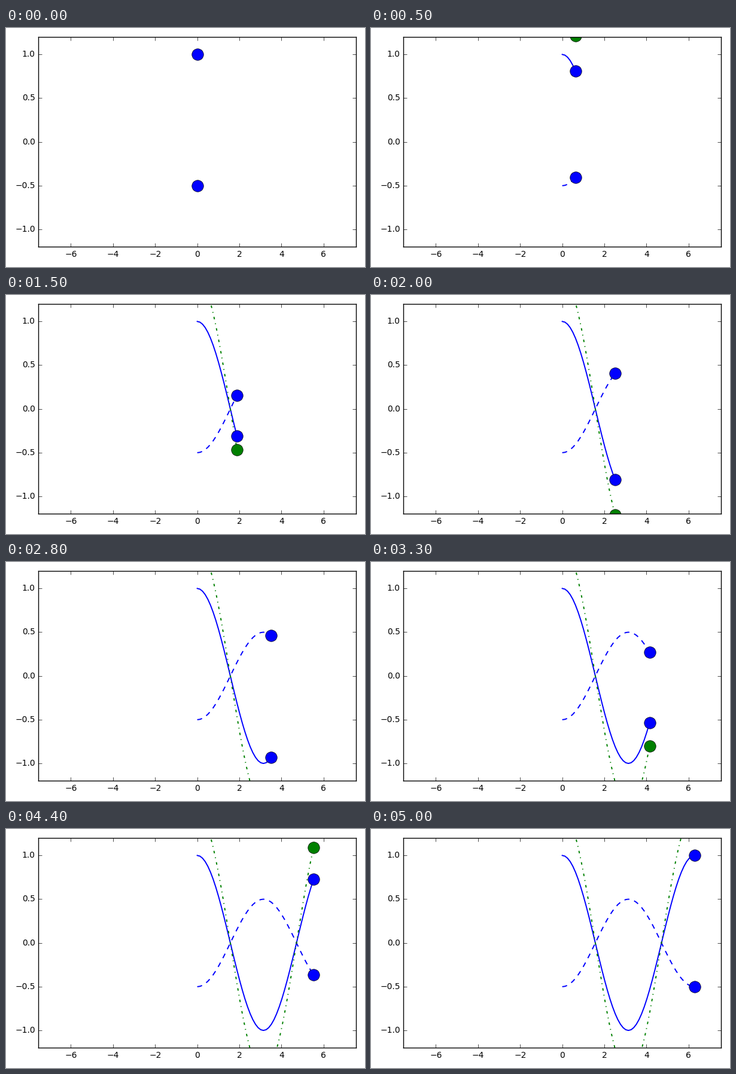
Animation of 600 by 400 pixels, one loop 5.1 s. Source, as a matplotlib script:

```python
import numpy as np
import matplotlib.pyplot as plt
from matplotlib.animation import FuncAnimation

STEPS = 51
W, H, DPI = 600, 400, 100
BOX = (54.3, 33.6, 585, 385)  # axes edges in pixels, origin bottom left

plt.rcParams.update({
    "font.family": "DejaVu Sans",
    "font.size": 10,
    "axes.linewidth": 1.0,
    "ytick.alignment": "center",
    "lines.scale_dashes": False,
    "lines.dashed_pattern": [6, 6],
    "lines.dashdot_pattern": [3, 5, 1, 5],
})

x = np.linspace(0, 2 * np.pi, STEPS)
# amplitude, colour, line style
WAVES = [(1.0, "blue", "-"), (-0.5, "blue", "--"), (1.5, "green", "-.")]

fig = plt.figure(figsize=(W / DPI, H / DPI), dpi=DPI, facecolor="white")
left, bottom, right, top = BOX
ax = fig.add_axes([left / W, bottom / H, (right - left) / W, (top - bottom) / H])
ax.set_xlim(-2.4 * np.pi, 2.4 * np.pi)
ax.set_ylim(-1.2, 1.2)
ax.set_xticks(range(-6, 7, 2))
ax.set_yticks(np.arange(-1, 1.5, 0.5))
ax.tick_params(direction="in", top=True, right=True, length=4, width=0.5, pad=4)
for spine in ax.spines.values():
    spine.set_zorder(3)

trails, dots = [], []
for amp, color, style in WAVES:
    trails += ax.plot([], [], color=color, ls=style, lw=1.4)
    dots += ax.plot([], [], "o", color=color, ms=14, mec="black", mew=0.5,
                    zorder=2.2)


def update(i):
    for (amp, _, _), trail, dot in zip(WAVES, trails, dots):
        y = amp * np.cos(x[:i + 1])
        trail.set_data(x[:i + 1], y)
        dot.set_data(x[i:i + 1], y[-1:])
    return trails + dots


anim = FuncAnimation(fig, update, frames=STEPS, init_func=lambda: update(0),
                     interval=100, repeat=True, repeat_delay=0)
plt.show()
```
